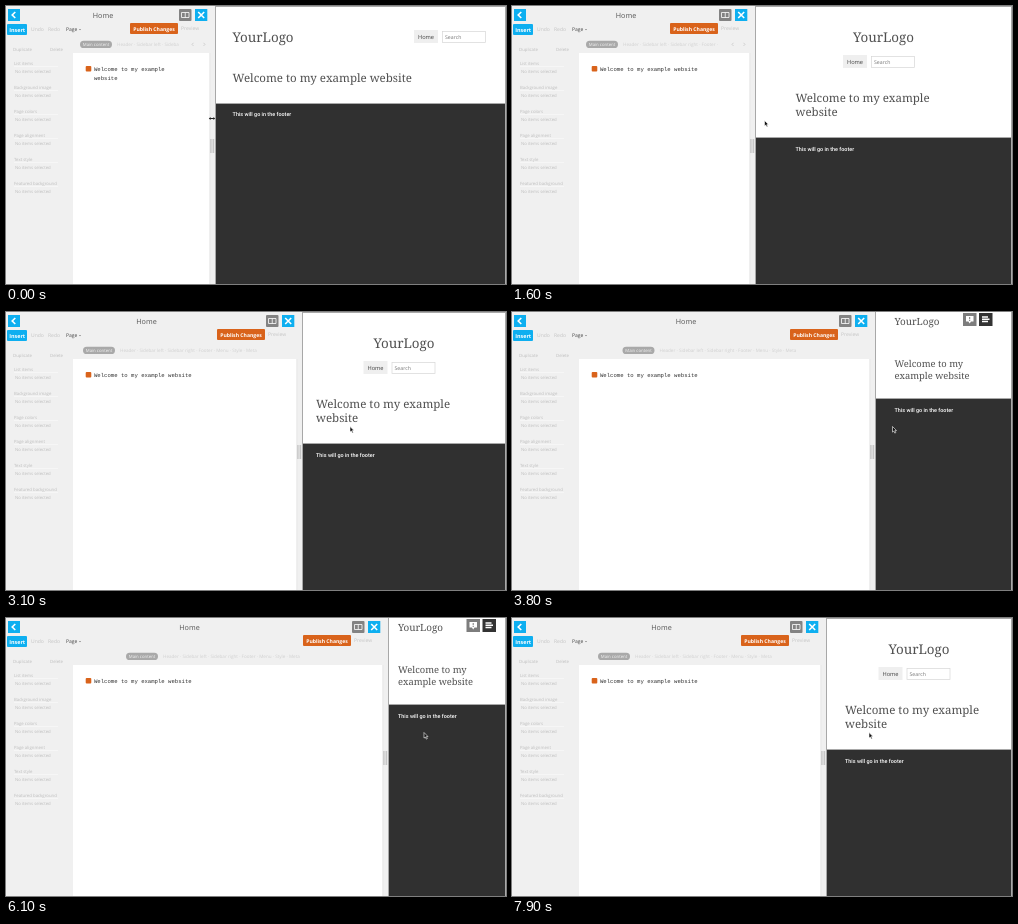
Recreate the animation shown at these times as an HTML page. Size 500 by 278 pixels, loop 8 s.

```html
<!DOCTYPE html>
<html lang="en">
<head>
<meta charset="utf-8">
<title>Resizable site editor</title>
<style>
  html, body { margin: 0; width: 100%; height: 100%; overflow: hidden; background: #fff; }
  svg { display: block; width: 100%; height: 100%; }
  text { font: 5.4px "Open Sans", sans-serif; fill: #444; text-rendering: geometricPrecision; }
  .faint { fill: #c4c4c4; font-size: 5px; }
  .tiny { fill: #bdbdbd; font-size: 4.3px; }
  .label { fill: #fff; font-weight: 700; }
  .mid { text-anchor: middle; }
  .mono { font: 5.62px "Liberation Mono", monospace; fill: #333; }
  .logo { font: 13.4px "Noto Serif", serif; fill: #505050; }
  .head { font: 11.5px "Noto Serif", serif; fill: #505050; }
  .narrow .logo { font-size: 9.9px; }
  .narrow .head { font-size: 9.4px; }
  .foot { font: 500 5.45px Roboto, sans-serif; fill: #fff; }
  .blue { fill: #0eaff0; }
  .orange { fill: #d9631b; }
  .line { fill: none; stroke: #fff; }
  .border { stroke: #a8a8a8; }
</style>
</head>
<body>
<svg viewBox="0 0 500 278">
  <defs>
    <clipPath id="tabClip"><rect id="tabArea" x="67" y="30" height="16"/></clipPath>
    <g id="nav">
      <rect width="24" height="13" fill="#efefef"/>
      <text class="mid" x="12" y="8.7" style="font-size:5.7px">Home</text>
      <rect x="28.5" y="1.5" width="43" height="11" fill="#fff" stroke="#d6d6d6" stroke-width=".7"/>
      <text x="31" y="8.7" style="font-size:5.2px;fill:#777">Search</text>
    </g>
  </defs>

  <rect width="500" height="278" fill="#fff"/>
  <rect id="frame" class="border" height="300" fill="#fff"/>
  <rect id="footer" class="border" height="300" fill="#303030"/>

  <g id="wide">
    <g id="wideText">
      <text class="logo" y="35.6">YourLogo</text>
      <text class="head" y="76.3">Welcome to my example website</text>
      <text class="foot" y="110.4">This will go in the footer</text>
    </g>
    <use href="#nav" x="408" y="24"/>
  </g>
  <g id="medium">
    <text class="logo mid" y="35.6">YourLogo</text>
    <use href="#nav" x="-40.5" y="49"/>
    <g id="mediumText">
      <text class="head" y="96.4">Welcome to my example</text>
      <text class="head" y="110.4">website</text>
      <text class="foot" y="144.5">This will go in the footer</text>
    </g>
  </g>
  <g id="narrow" class="narrow">
    <text class="logo" x="-49" y="13">YourLogo</text>
    <rect x="19.5" y="1" width="13.5" height="13" fill="#7d7d7d"/>
    <path d="M22.5 4h7.5v5.5h-2.5l-1.3 2-1.3-2h-2.4z" fill="#fff"/>
    <path d="M26.2 5v2.3m0 .7v1" stroke="#777"/>
    <rect x="35.5" y="1" width="13.5" height="13" fill="#333"/>
    <path class="line" d="M38.5 5h6m-6 2.2h7.5m-7.5 2.2h6" stroke-width="1.5"/>
    <text class="head" x="-49" y="54.5">Welcome to my</text>
    <text class="head" x="-49" y="66.7">example website</text>
    <text class="foot" x="-49" y="99.6">This will go in the footer</text>
  </g>

  <rect id="panel" height="278" fill="#f0f0f0"/>
  <rect id="editor" x="67" y="47" height="231" fill="#fff"/>
  <rect class="blue" x="2" y="3" width="12" height="12"/>
  <path class="line" d="M9.3 6L6.2 9l3.1 3" stroke-width="1.6"/>
  <rect class="blue" x="1" y="18" width="20" height="11" rx="1"/>
  <text class="label mid" x="11.2" y="25.5">Insert</text>
  <text class="faint" x="25" y="25.4">Undo</text>
  <text class="faint" x="42" y="25.4">Redo</text>
  <text x="60" y="25.4" style="font-size:5px">Page</text>
  <path d="M73 23h2l-1 1.3z" fill="#777"/>
  <text class="tiny" x="7" y="45">Duplicate</text>
  <text class="tiny" x="44" y="45">Delete</text>
  <g id="fields"></g>

  <rect class="orange" x="79.7" y="60" width="5.6" height="5.6" rx="1"/>
  <text class="mono" id="line1" x="88" y="65"></text>
  <text class="mono" id="line2" x="88" y="73.5"></text>

  <g clip-path="url(#tabClip)">
    <g id="tabs">
      <rect y="34.7" width="32" height="7.4" rx="3.7" fill="#a9a9a9"/>
      <text class="mid" x="16" y="40" style="font-size:4.3px;fill:#f4f4f4">Main content</text>
      <text x="37" y="40.2" style="font-size:4.6px;fill:#d0d0d0">Header · Sidebar left · Sidebar right · Footer · Menu · Style · Meta</text>
    </g>
  </g>
  <text class="mid" id="title" y="12" style="font-size:7.2px;fill:#555">Home</text>

  <g id="edge">
    <rect x="-36" y="3" width="12.5" height="12" rx="1" fill="#838383"/>
    <path class="line" d="M-33.5 6.5h7.5v5h-7.5zm3.75 0v5" stroke-width=".8"/>
    <rect class="blue" x="-20" y="3" width="12.3" height="12"/>
    <path class="line" d="M-16.8 6l6 6m0-6l-6 6" stroke-width="1.6"/>
    <rect class="orange" x="-85" y="17" width="48" height="11" rx="1"/>
    <text class="label mid" x="-61" y="24.5" style="font-size:5.1px">Publish Changes</text>
    <text class="faint" x="-34" y="24.4">Preview</text>
    <path id="arrows" d="M-21.5 36.8l-1.5 1.6 1.5 1.6m10-3.2l1.5 1.6-1.5 1.6" fill="none" stroke="#bbb" stroke-width=".6"/>
    <rect x="-4.5" y="133" width="3.5" height="14" fill="#dcdcdc"/>
    <path d="M-4.3 133v14m3-14v14" stroke="#b5b5b5" stroke-width=".7"/>
    <path d="M-5.2 47v231" stroke="#ddd" stroke-width=".6"/>
  </g>

  <path id="resize" d="M-3.2 0l1.8-1.6v1.1h2.8v-1.1L3.2 0 1.4 1.6V.5h-2.8v1.1z" fill="#222"/>
  <path id="arrow" d="M0 0v5.6l1.3-1.1 1 2.1 1-.5-1-2h1.7z" fill="#111" stroke="#fff" stroke-width=".6"/>
</svg>
<script>
const LOOP = 8000, STEP = 100;
const WIDE_LIMIT = 228, BOX_LIMIT = 305, NARROW_LIMIT = 330;
const $ = id => document.getElementById(id);

// [time, x] pairs
const dividerPath = [[0, 209], [1600, 243], [2700, 280], [3100, 296], [3800, 363], [4100, 376],
  [4500, 382], [6900, 382], [7200, 371], [7500, 348], [7800, 314], [LOOP, 314]];
const cursorPath = [[0, 206], [1600, 252.5], [3100, 344], [3800, 380.5], [4500, 408], [5200, 418],
  [6100, 418], [6900, 404], [7500, 375.5], [7800, 358.5], [7900, 357], [LOOP, 357]];

function along(path, t) {
  const i = path.findIndex(([time]) => time > t);
  const [t0, x0] = path[i - 1], [t1, x1] = path[i];
  return x0 + (x1 - x0) * (t - t0) / (t1 - t0);
}
const move = (id, x, y = 0) => $(id).setAttribute('transform', `translate(${x} ${y})`);
const show = (id, on) => $(id).setAttribute('visibility', on ? 'visible' : 'hidden');
const set = (id, attributes) => {
  for (const name in attributes) $(id).setAttribute(name, attributes[name]);
};

$('fields').innerHTML = ['List items', 'Background image', 'Page colors', 'Page alignment', 'Text style', 'Featured background']
  .map((name, i) => `<g transform="translate(0 ${i * 24})">
    <text class="tiny" x="8" y="58.5">${name}</text>
    <path d="M8 60.5h44" stroke="#f8f8f8" stroke-width=".8"/>
    <text class="tiny" x="9" y="66.8">No items selected</text></g>`).join('');

function draw(t) {
  const d = along(dividerPath, t), center = (d + 500) / 2;
  const wide = d < WIDE_LIMIT, narrow = d > NARROW_LIMIT;

  show('wide', wide);
  show('medium', !wide && !narrow);
  show('narrow', narrow);
  const preview = { x: d + .5, width: 499 - d };
  set('frame', { ...preview, y: narrow ? -5 : .5 });
  set('footer', { ...preview, y: wide ? 97.5 : narrow ? 86.5 : 131.5 });
  move('wideText', d + 17.6);
  move('medium', center);
  move('mediumText', d < BOX_LIMIT ? -88 : -74);
  move('narrow', center);

  set('panel', { width: d });
  set('editor', { width: d - 72.2 });
  set('title', { x: (d - 15) / 2 });
  set('tabArea', { width: d - 67 - (d < 290 ? 36 : 8) });
  move('tabs', Math.max(74, 77 + (d - 296) / 2));
  move('edge', d);
  show('arrows', d < 290);

  const wrapped = d < 216;
  $('line1').textContent = 'Welcome to my example' + (wrapped ? '' : ' website');
  $('line2').textContent = wrapped ? 'website' : '';

  const x = along(cursorPath, t), resizing = t < 400;
  show('resize', resizing);
  show('arrow', !resizing);
  move('resize', x, 112.5);
  move('arrow', x, 114.5);
}

function tick() {
  draw(Math.floor(performance.now() % LOOP / STEP) * STEP);
  requestAnimationFrame(tick);
}
tick();
</script>
</body>
</html>
```
